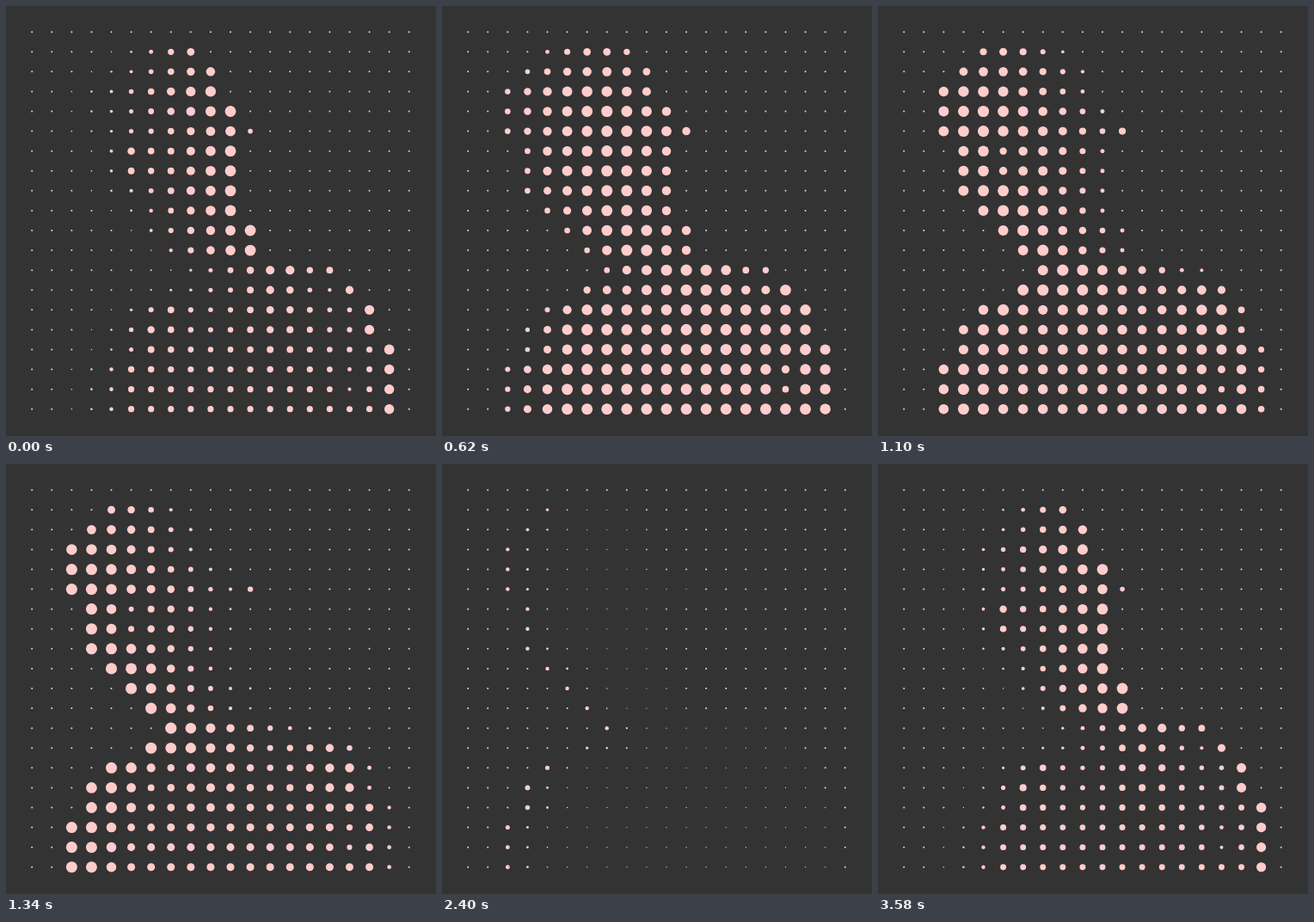
An HTML page with a canvas that plays this animation: 500x500 px, repeating every 3600 ms.

```html
<!DOCTYPE html>
<html lang="en">
<head>
<meta charset="utf-8">
<title>Halftone bust</title>
<style>
html, body { margin: 0; height: 100%; overflow: hidden; background: #333; }
canvas { display: block; }
</style>
</head>
<body>
<canvas id="stage" width="500" height="500"></canvas>
<script>
const LOOP = 3600, COUNT = 20, START = 30.2, STEP = 23.08;
const REST = 1, DARK = 0.6, BRIGHT = 6;
const LEFT_LIT = 1410, RIGHT_LIT = 160, FRONT_LIT = 750; // ms at which each side faces the light
const NECK = 10, CHEST = 13; // first rows
const ctx = document.getElementById('stage').getContext('2d');

// Outline corners as [row, column].
const leftEdge = [[1, 4], [3, 2], [5, 2], [6, 3], [8, 3], [12, 7], [15, 3], [17, 2], [19, 2]];
const rightEdge = [[1, 8], [2, 9], [3, 9], [4, 10], [5, 11], [6, 10], [9, 10], [10, 11],
  [11, 11], [12, 15], [14, 17], [15, 17], [16, 18], [19, 18]];

// Soft spots that turn the surface (delay, ms) or shade it.
const spots = [
  { name: 'cheek', row: 6.4, col: 5, reach: 1, delay: -600, shade: 0.15 },
  { name: 'ear', row: 5, col: 11, reach: 0.5, delay: 550, shade: 0.3 },
  { name: 'shoulder', row: 12, col: 14.5, reach: 1.1, delay: 100, shade: 0.5 },
  { name: 'arm fold', row: 17.6, col: 16, reach: 0.7, delay: 100, shade: 0.6 }
];

function edgeAt(corners, row) {
  const i = corners.findIndex(([r]) => r >= row);
  const [r1, c1] = corners[i], [r0, c0] = corners[Math.max(0, i - 1)];
  return Math.round(r1 === row ? c1 : c0 + (c1 - c0) * (row - r0) / (r1 - r0));
}

// Time at which a point of the bust is fully lit.
function basePeak(row, col, left, right) {
  if (row < CHEST) {
    const across = ((col - left) / (right - left)) ** (row < NECK ? 1 : 0.7);
    return LEFT_LIT + (RIGHT_LIT - LEFT_LIT) * across;
  }
  const leftTurn = 700 * Math.max(0, 1 - (col - left) / 3);
  const rightTurn = col === right ? 370 : 0;
  const folds = 40 * Math.max(0, 17.5 - row) * Math.cos((col - 9) / 6.5 * 2 * Math.PI);
  return FRONT_LIT + leftTurn - rightTurn + folds;
}

function makeDot(row, col) {
  const dot = { x: START + col * STEP, y: START + row * STEP, inside: false };
  if (row === 0) return dot;
  const left = edgeAt(leftEdge, row), right = edgeAt(rightEdge, row);
  if (col < left || col > right) return dot;
  dot.inside = true;
  dot.peak = basePeak(row, col, left, right);
  dot.strength = BRIGHT * Math.min(1, 0.5 + 0.15 * row);
  for (const s of spots) {
    const near = Math.exp(-((row - s.row) ** 2 + (col - s.col) ** 2) / s.reach ** 2);
    dot.peak += s.delay * near;
    dot.strength *= 1 - s.shade * near;
  }
  return dot;
}

function radius(dot, time) {
  if (!dot.inside) return REST;
  const light = (1 + Math.cos((time - dot.peak) / LOOP * 2 * Math.PI)) / 2;
  return DARK + dot.strength * light ** 1.5;
}

const dots = Array.from({ length: COUNT * COUNT },
  (_, i) => makeDot(Math.floor(i / COUNT), i % COUNT));

function draw() {
  const time = performance.now() % LOOP;
  ctx.fillStyle = '#333';
  ctx.fillRect(0, 0, 500, 500);
  ctx.fillStyle = '#ffcccc';
  for (const dot of dots) {
    ctx.beginPath();
    ctx.arc(dot.x, dot.y, radius(dot, time), 0, 2 * Math.PI);
    ctx.fill();
  }
  requestAnimationFrame(draw);
}
draw();
</script>
</body>
</html>
```
